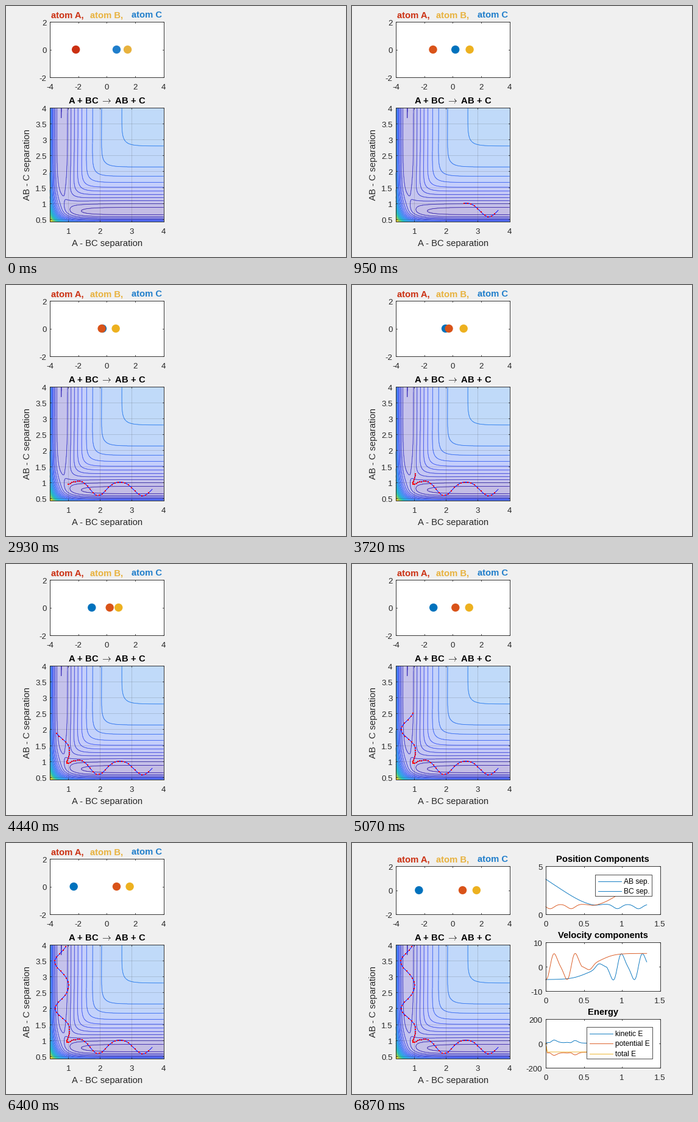
Write a matplotlib script that moves like this. It is 558 by 412 pixels and loops after 7.65 s.

```python
import numpy as np
import matplotlib.pyplot as plt
from matplotlib.animation import FuncAnimation
from matplotlib.colors import LinearSegmentedColormap
from matplotlib.patches import Circle, Rectangle

W, H, DPI = 558, 412, 64
PT = 72 / DPI                      # points per pixel
INTERVAL, LOOP = 30, 7650
SUMMARY_AT = 6870                  # when the result plots appear
DT = 0.0204                        # simulated time per step
STEPS, SUB = 65, 8

plt.rcParams["font.family"] = "Liberation Sans"
plt.rcParams["mathtext.fontset"] = "cm"
INK = (0.15, 0.15, 0.15)
BLUE, ORANGE, YELLOW = "#0072BD", "#D95319", "#EDB120"
DEEP = ["#CB3012", "#E8B23E", "#207ECB"]       # atoms A, B, C at rest
LIVE = [ORANGE, YELLOW, BLUE]
PARULA = LinearSegmentedColormap.from_list("parula", [
    "#3E26A8", "#435BF5", "#2797EB", "#1DBDB8", "#81CC59", "#ECC62C", "#F9FB15"])


def step_times():
    """Steps follow a regular beat that pauses ever more often."""
    n = np.arange(1, STEPS + 1)
    pauses = np.floor(.785 + .1915 * n + .00097 * n**2)
    return 79.1 * (n + pauses)


def softplus(u, width):
    return width * np.log1p(np.exp(u / width))


def vibration(u):
    """Bond oscillation that fades in, slowly at first, before u = 0."""
    phase = 2 * np.pi / 13.55 * np.where(u < 0, .45 * u, u)
    fade = 1 / (1 + np.exp(-(u + 6) / 1.5))
    return fade * (.215 * np.cos(phase) + .05 * np.sin(phase)**2)


def energy_surface(ab, bc):
    """LEPS potential of three atoms on a line."""
    def terms(r, depth, beta, r0, sato):
        e = np.exp(-beta * (r - r0))
        bond = depth * (e**2 - 2 * e)
        anti = sato * depth / 2 * (e**2 + 2 * e)
        return (bond + anti) / 2, (bond - anti) / 2
    q1, j1 = terms(ab, 94.1, 2.01, .78, .72)
    q2, j2 = terms(bc, 109.4, 1.942, .742, .95)
    q3, j3 = terms(ab + bc, 109.4, 1.942, .742, 1.05)
    mix = ((j1 - j2)**2 + (j2 - j3)**2 + (j3 - j1)**2) / 2
    return q1 + q2 + q3 - np.sqrt(mix)


fig = plt.figure(figsize=(W / DPI, H / DPI), dpi=DPI, facecolor="#F0F0F0")
ax = fig.add_axes([0, 0, 1, 1])
ax.set_xlim(0, W)
ax.set_ylim(H, 0)
ax.axis("off")


def label(x, y, s, size=13.3, color=INK, ha="center", bold=False, z=8):
    """Text whose capitals are centred on y."""
    return ax.text(x, y + .36 * size, s, fontsize=size * PT, color=color,
                   ha=ha, va="baseline", zorder=z,
                   fontweight="bold" if bold else "normal")


def line(x, y, color, width=1.0, z=4, **kw):
    return ax.plot(x, y, color=color, lw=width * PT, zorder=z, **kw)[0]


class Panel:
    def __init__(self, box, xlim, ylim, xticks, yticks):
        self.box, self.xlim, self.ylim = box, xlim, ylim
        x0, y0, x1, y1 = box
        self.parts = [
            ax.add_patch(Rectangle((x0, y0), x1 - x0, y1 - y0, fc="white",
                                   ec="none", zorder=1)),
            ax.add_patch(Rectangle((x0, y0), x1 - x0, y1 - y0, fc="none",
                                   ec=INK, lw=.9 * PT, zorder=6))]
        for v in xticks:
            p = self.px(v)
            self.parts.append(label(p, y1 + 15, f"{v:g}"))
            for a, b in ((y0, y0 + 2), (y1, y1 - 2)):
                self.parts.append(line([p, p], [a, b], INK, .8, 6))
        for v in yticks:
            p = self.py(v)
            self.parts.append(label(x0 - 5.5, p + 1.2, f"{v:g}", ha="right"))
            for a, b in ((x0, x0 + 2), (x1, x1 - 2)):
                self.parts.append(line([a, b], [p, p], INK, .8, 6))

    def px(self, v):
        x0, _, x1, _ = self.box
        a, b = self.xlim
        return x0 + (v - a) / (b - a) * (x1 - x0)

    def py(self, v):
        _, y0, _, y1 = self.box
        a, b = self.ylim
        return y1 - (v - a) / (b - a) * (y1 - y0)

    def curve(self, x, y, color):
        self.parts.append(line(self.px(x), self.py(y), color, .9))

    def title(self, s):
        x0, y0, x1, _ = self.box
        self.parts.append(label((x0 + x1) / 2, y0 - 12, s, 14.8, "black", bold=True))

    def legend(self, box, names, colors):
        x0, y0, x1, y1 = box
        self.parts.append(ax.add_patch(Rectangle(
            (x0, y0), x1 - x0, y1 - y0, fc="white", ec=INK, lw=.8 * PT, zorder=7)))
        for i, (s, color) in enumerate(zip(names, colors)):
            y = y0 + 10.5 + 16.5 * i
            self.parts.append(line([x0 + 5, x0 + 43], [y, y], color, .9, 8))
            self.parts.append(label(x0 + 47, y, s, 12, "black", "left"))

    def show(self, on):
        for p in self.parts:
            p.set_visible(on)


def atom_panel(top):
    panel = Panel((72, top, 258.5, 117), (-4, 4), (-2, 2),
                  range(-4, 5, 2), range(-2, 3, 2))
    for x, name, color in zip((74, 138, 206), ("A,", "B,", "C"), DEEP):
        panel.parts.append(label(x, top - 12, "atom " + name, 14.7, color,
                                 "left", bold=True))
    return panel


# trajectory: A flies in while BC vibrates, then C leaves and AB vibrates
step = np.linspace(0, STEPS, STEPS * SUB + 1)
time = step * DT
ab = .79 + .108 * softplus(26.4 - step, 4.8) + vibration(step - 39.3)
bc = .79 + .111 * softplus(step - 35.6, 4.3) + vibration(23.1 - step)
v_ab, v_bc = np.gradient(ab, time), np.gradient(bc, time)

# atoms
tall, short = atom_panel(26), atom_panel(38)
atoms = [ax.add_patch(Circle((0, 0), 6.7, ec="none", zorder=z)) for z in (4.6, 4.5, 4.4)]

# energy surface
LO, HI = .42, 4
surface = Panel((72, 167, 258.5, 354), (LO, HI), (LO, HI), range(1, 5),
                np.arange(.5, 4.1, .5))
surface.title(r"A + BC $\rightarrow$ AB + C")
label(166, 388.5, "A - BC separation", 14.8)
ax.text(35.5, 260.5, "AB - C separation", fontsize=14.8 * PT, color=INK,
        rotation=90, ha="center", va="center")
axis = np.linspace(LO, HI, 220)
gx, gy = np.meshgrid(axis, axis)
field = energy_surface(gx, gy)
levels = np.arange(-104, 280, 10)
style = dict(cmap=PARULA, vmin=-110, vmax=275)
px, py = surface.px(gx), surface.py(gy)
ax.contourf(px, py, field, levels, alpha=.3, extend="both", zorder=2, **style)
ax.contour(px, py, field, levels, linewidths=.85 * PT, linestyles="solid",
           zorder=3, **style)
for v in range(1, 4):
    line([surface.px(v)] * 2, [167, 354], INK, 1, 3.5, alpha=.15)
for v in np.arange(.5, 4, .5):
    line([72, 258.5], [surface.py(v)] * 2, INK, 1, 3.5, alpha=.15)

track_x, track_y = surface.px(ab), surface.py(bc)
track = line([], [], "blue", .9, 4)
dots = line([], [], "red", 0, 4.1, ls="none", marker="s", ms=2.4 * PT, mew=0)
for artist in (track, dots):
    artist.set_clip_path(surface.parts[0])


def result_panel(title, top, bottom, yticks, curves):
    panel = Panel((318, top, 505.5, bottom), (0, 1.5), (yticks[0], yticks[-1]),
                  np.arange(0, 1.6, .5), yticks)
    panel.title(title)
    for values, color in zip(curves, (BLUE, ORANGE, YELLOW)):
        panel.curve(time, values, color)
    return panel


# result plots
v_b = (v_ab + v_bc) / 3
kinetic = (v_b**2 + (v_b - v_ab)**2 + (v_b - v_bc)**2) / 2
ramp = np.minimum(step, 1)         # energies are zero at the first sample

position = result_panel("Position Components", 38, 117, (0, 5), (ab, bc))
position.legend((399, 52, 492, 87), ("AB sep.", "BC sep."), (BLUE, BLUE))
velocity = result_panel("Velocity components", 163, 243, (-10, 0, 10), (v_ab, v_bc))
energy = result_panel("Energy", 289, 369, (-200, 0, 200),
                      (kinetic * ramp, (-70 - kinetic) * ramp, -70 * ramp))
energy.legend((385, 302, 493, 354), ("kinetic E", "potential E", "total E"),
              (BLUE, ORANGE, YELLOW))

STEP_TIMES = step_times()


def update(k):
    now = k * INTERVAL + 20
    n = int(np.searchsorted(STEP_TIMES, now, "right"))
    done = now >= SUMMARY_AT
    tall.show(not done)
    for panel in (short, position, velocity, energy):
        panel.show(done)

    # the centre of mass stays at zero
    i = n * SUB
    b = (ab[i] + bc[i]) / 3
    stage = short if done else tall
    for atom, x, color in zip(atoms, (b - ab[i], b, b - bc[i]), LIVE if n else DEEP):
        atom.center = stage.px(x), stage.py(0)
        atom.set_facecolor(color)

    track.set_data(track_x[:i + 1], track_y[:i + 1])
    dots.set_data(track_x[SUB:i + 1:SUB], track_y[SUB:i + 1:SUB])
    return [track, dots, *atoms]


anim = FuncAnimation(fig, update, frames=LOOP // INTERVAL, interval=INTERVAL,
                     repeat=True, repeat_delay=0, blit=False)
plt.show()
```
